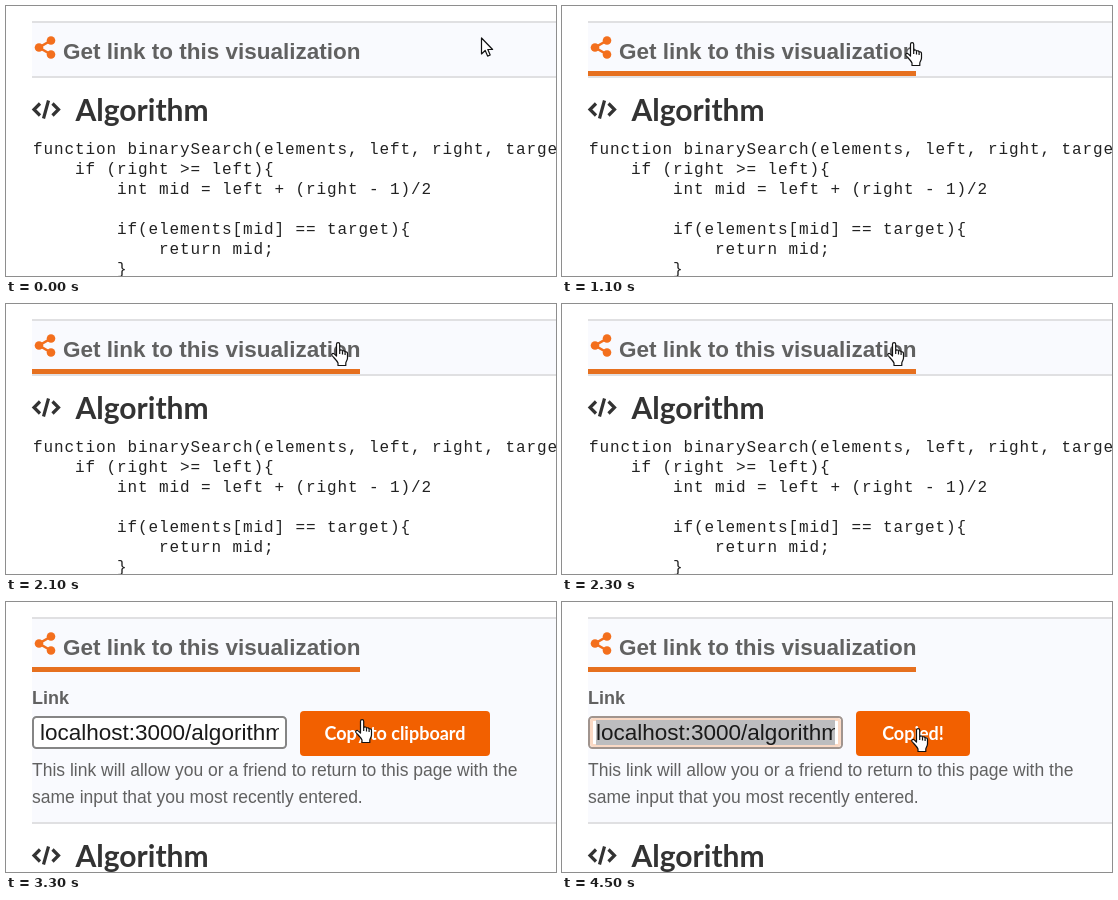
These frames come from a looping animation (550x270 px, 4600 ms). An HTML page:

```html
<!DOCTYPE html>
<html lang="en">
<head>
<meta charset="utf-8">
<title>Copy a link</title>
<style>
  html, body { margin: 0; width: 100%; height: 100%; overflow: hidden; background: #fff; }
  svg { display: block; }
  text { font-family: "Liberation Sans", Arial, sans-serif; fill: #616161; white-space: pre; }
  .bold { font-weight: 700; }
  .lato { font-family: Lato, sans-serif; font-weight: 700; }
  .code text { font: 16px "Liberation Mono", "Courier New", monospace; letter-spacing: .9px; fill: #222; }
  .pointer { fill: #fff; stroke: #111; stroke-width: 1.2; stroke-linejoin: round; }
</style>
</head>
<body>
<svg width="550" height="270" viewBox="0 0 550 270">
  <defs>
    <clipPath id="panelClip"><rect id="panelMask" x="26" y="72" width="524" height="0"/></clipPath>
    <clipPath id="fieldClip"><rect x="34" y="114" width="239" height="33"/></clipPath>
  </defs>

  <rect id="panel" x="26" y="16" width="524" height="55" fill="#f9fafe"/>
  <rect x="26" y="15" width="524" height="2" fill="#e0e0e2"/>
  <g fill="#f36f1d" stroke="#f36f1d" stroke-width="2.6">
    <path d="M45 34.5L33 41.5 45 48.5" fill="none"/>
    <g stroke="none">
      <circle cx="45" cy="34.5" r="4.3"/>
      <circle cx="33" cy="41.5" r="4.3"/>
      <circle cx="45" cy="48.5" r="4.3"/>
    </g>
  </g>
  <text class="bold" x="57" y="53" font-size="22.5">Get link to this visualization</text>

  <g clip-path="url(#panelClip)">
    <text class="bold" x="26" y="102" font-size="18">Link</text>
    <rect id="field" x="27" y="115" width="253" height="31" rx="3.5" fill="#fff" stroke="#858585" stroke-width="2"/>
    <g id="focus">
      <rect x="29.5" y="117.5" width="248" height="26" rx="2" fill="#fff" stroke="#fad9c5" stroke-width="3"/>
      <rect x="34" y="118" width="239" height="25" fill="#bdbdbf"/>
    </g>
    <text x="34" y="138" font-size="22.5" style="fill:#1a1a1a" clip-path="url(#fieldClip)">localhost:3000/algorithm</text>
    <rect id="button" x="294" y="109" width="190" height="45" rx="4"/>
    <text id="label" class="lato" x="389" y="138" font-size="18" text-anchor="middle" style="fill:#fff"></text>
    <text x="26" y="174" font-size="17.5">This link will allow you or a friend to return to this page with the</text>
    <text x="26" y="201" font-size="17.5">same input that you most recently entered.</text>
  </g>

  <g id="below">
    <rect x="26" y="70" width="524" height="2" fill="#e0e0e2"/>
    <path d="M34 97.5L28 103.5 34 109.5M42.5 94.5L37.5 112.5M46.5 97.5L52.5 103.5 46.5 109.5" fill="none" stroke="#333" stroke-width="3.2"/>
    <text class="lato" x="69.5" y="115" font-size="30" style="fill:#333">Algorithm</text>
    <g class="code">
      <text x="27" y="148">function binarySearch(elements, left, right, target){</text>
      <text x="27" y="168">    if (right &gt;= left){</text>
      <text x="27" y="188">        int mid = left + (right - 1)/2</text>
      <text x="27" y="228">        if(elements[mid] == target){</text>
      <text x="27" y="248">            return mid;</text>
      <text x="27" y="268">        }</text>
    </g>
  </g>
  <rect id="underline" x="26" y="65" width="328" height="5" fill="#e6701f"/>

  <g id="cursor" class="pointer">
    <path id="arrow" d="M.5 0V16L4.2 12.5 6.6 18.1 9.2 17 6.8 11.5H11.6Z"/>
    <g id="hand" transform="translate(-7 0)">
      <path d="M5.5 2.2a1.6 1.6 0 0 1 3.2 0V8.5c1-1 2.6-.6 2.8.6 1-.7 2.4-.3 2.6.9 1.2-.5 2.4.2 2.4 1.6V16c0 2-1.5 3.5-1.7 5v2.5H7V21C6 18.5 3 16 1 13.5c-1-1.6.8-2.8 2.2-1.6L5.5 14Z"/>
      <path d="M8.7 8.5V12M11.5 9.3V12.5M14.1 10.3V13" fill="none"/>
    </g>
  </g>
</svg>
<script>
const LOOP = 4600, STEP = 100, OPEN_HEIGHT = 150;
const $ = id => document.getElementById(id);
const show = (id, on) => $(id).setAttribute('visibility', on ? 'visible' : 'hidden');

// Pointer stops: time, x, y
const stops = [
  [0, 475, 32], [300, 475, 32], [1100, 350, 36], [1500, 350, 36], [2000, 332, 38],
  [2600, 332, 38], [3200, 356, 117], [3300, 356, 117], [3600, 356, 126], [LOOP, 356, 126]
];

const progress = (t, from, to) => {
  const p = Math.min(1, Math.max(0, (t - from) / (to - from)));
  return p * p * (3 - 2 * p);
};

function pointerAt(t) {
  const i = stops.findIndex(s => s[0] > t);
  const [t0, x0, y0] = stops[i - 1], [t1, x1, y1] = stops[i];
  const p = progress(t, t0, t1);
  return [x0 + (x1 - x0) * p, y0 + (y1 - y0) * p];
}

function draw(t) {
  const [x, y] = pointerAt(t);
  const open = OPEN_HEIGHT * progress(t, 2300, 2500);
  const overLink = t >= 900 && y < 70;
  const overButton = t > 2600 && y > 109;
  const copied = t >= 3700;
  const pressed = copied && t < 3900;

  $('panel').setAttribute('height', 55 + open);
  $('panelMask').setAttribute('height', open);
  $('below').setAttribute('transform', `translate(0 ${open})`);
  show('underline', t >= 900);

  $('button').setAttribute('width', copied ? 114 : 190);
  $('button').setAttribute('fill', pressed ? '#ec6000' : overButton ? '#f26000' : '#f36f1d');
  $('label').setAttribute('x', copied ? 351 : 389);
  $('label').textContent = copied ? 'Copied!' : 'Copy to clipboard';
  $('field').setAttribute('stroke', copied ? '#a0948e' : '#858585');
  show('focus', copied);

  $('cursor').setAttribute('transform', `translate(${x} ${y})`);
  show('hand', overLink || overButton);
  show('arrow', !overLink && !overButton);
}

const start = performance.now();
function tick() {
  const t = (performance.now() - start) % LOOP;
  draw(Math.floor(t / STEP) * STEP);
  requestAnimationFrame(tick);
}
tick();
</script>
</body>
</html>
```
